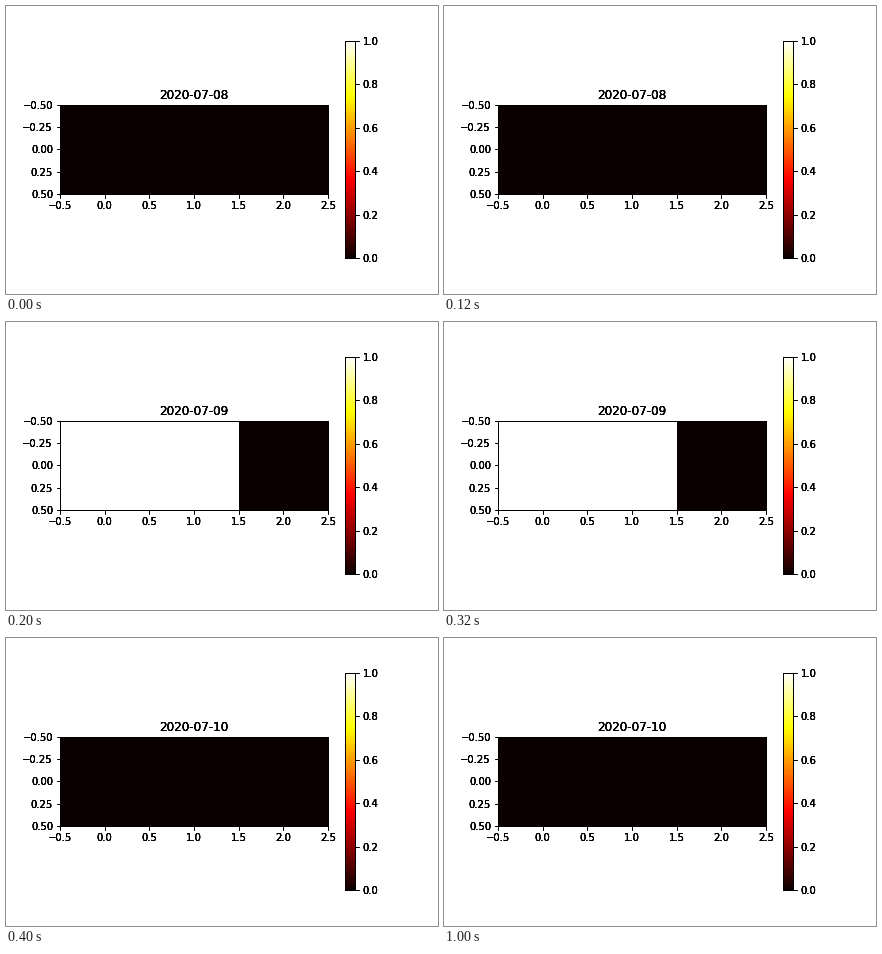
Write a matplotlib script that moves like this. It is 432x288 px and loops after 1400 ms.

```python
import numpy as np
import matplotlib.pyplot as plt
from matplotlib.animation import FuncAnimation

STEP = 200  # ms
FRAMES = 7
DAYS = [(0, 0, 0), (1, 1, 0), (0, 0, 0)]


def darken(artist, times=4):
    """Draw an artist repeatedly so its soft edges turn solid."""
    draw = artist.draw

    def repeat(renderer, *args, **kwargs):
        for _ in range(times):
            draw(renderer, *args, **kwargs)

    artist.draw = repeat


fig, ax = plt.subplots(figsize=(6, 4), dpi=72, facecolor="white")
fig.subplots_adjust(left=0.125, right=0.9, bottom=0.125, top=0.88)

image = ax.imshow(np.array([DAYS[0]]), cmap="hot", vmin=0, vmax=1,
                  interpolation="nearest")
bar = fig.colorbar(image)
ax.set_xticks(np.arange(-0.5, 2.6, 0.5))
ax.set_yticks(np.arange(-0.5, 0.6, 0.25))
title = ax.set_title("2020-07-08")

for part in (title, ax.xaxis, ax.yaxis, bar.ax.yaxis, bar.outline,
             *ax.spines.values()):
    darken(part)


def update(i):
    day = min(i, len(DAYS) - 1)
    image.set_data(np.array([DAYS[day]]))
    title.set_text(f"2020-07-{8 + day:02d}")
    return image, title


anim = FuncAnimation(fig, update, frames=FRAMES, interval=STEP,
                     repeat=True, repeat_delay=0, blit=False)
plt.show()
```
